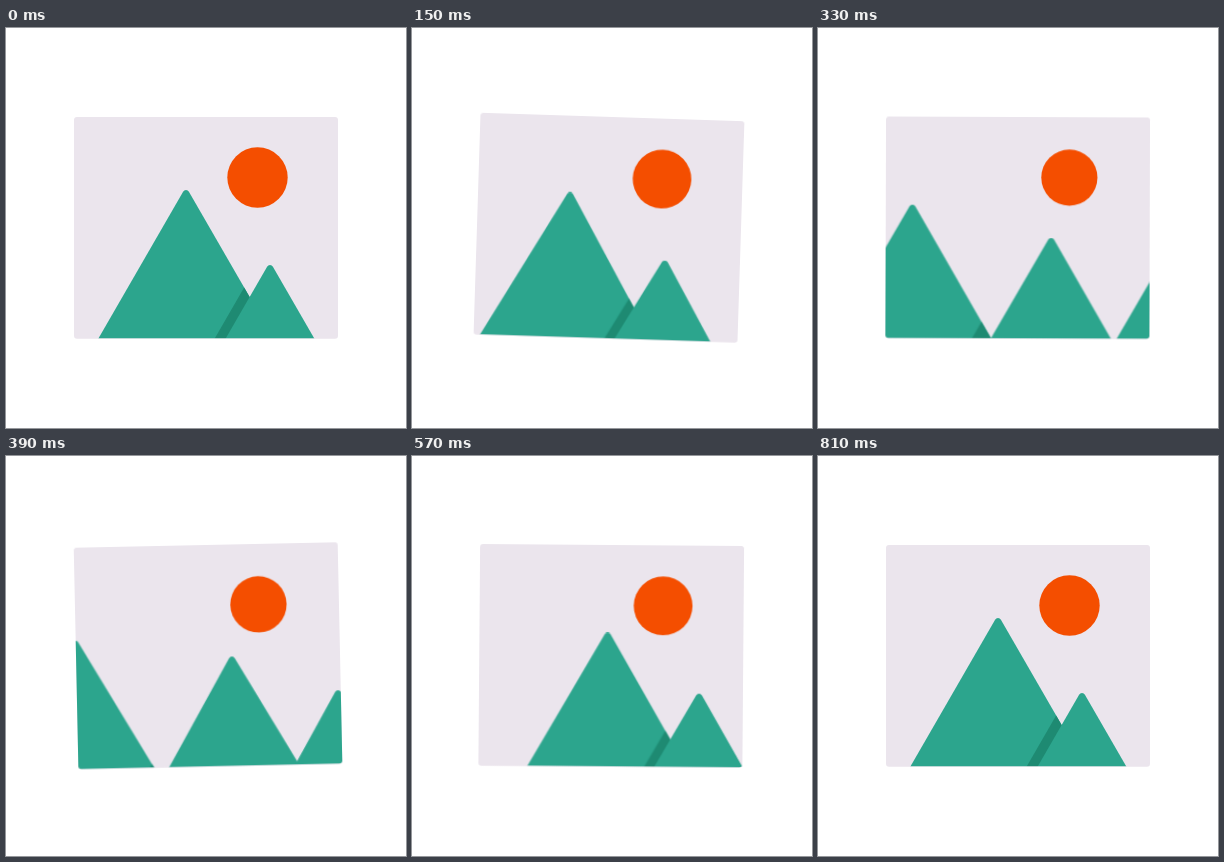
These frames come from a looping animation (400x400 px, 2.87 s). An HTML page without scripts:

```html
<!DOCTYPE html>
<html lang="en">
<head>
<meta charset="utf-8">
<title>Picture placeholder</title>
<style>
  html, body { margin: 0; width: 100%; height: 100%; overflow: hidden; background: #fff; }
  svg { display: block; width: 100vw; height: 100vh; }

  .card, .sun, .move, .shade { animation: 2870ms linear infinite; }
  .card { animation-name: sway; transform-origin: 200px 104px; }
  .sun { animation-name: pulse; transform-origin: 251.5px 149.5px; fill: #f44e00; }
  .move { animation-name: move; }
  .peak { fill: #2ca58d; }
  .shade { fill: #1e8a72; }
  .leave { animation-name: leave; }
  .arrive { animation-name: arrive; }

  /* every mountain glides from --a to --b on the same sine ease */
  @keyframes move {
    0% { transform: translate(var(--a)); animation-timing-function: cubic-bezier(.364, 0, .636, 1); }
    28%, 100% { transform: translate(var(--b)); }
  }
  @keyframes sway {
    0% { transform: rotate(0deg); animation-timing-function: ease-in-out; }
    5.23% { transform: rotate(1.8deg); animation-timing-function: ease-in; }
    11.5% { transform: rotate(.2deg); animation-timing-function: ease-out; }
    14.3% { transform: rotate(-1.35deg); animation-timing-function: ease-in-out; }
    19.86% { transform: rotate(.45deg); animation-timing-function: ease-in-out; }
    28%, 100% { transform: rotate(0deg); }
  }
  @keyframes pulse {
    0% { transform: scale(1); animation-timing-function: ease-in-out; }
    11.8% { transform: scale(.93); animation-timing-function: ease-in-out; }
    26%, 100% { transform: scale(1); }
  }
  /* shadow width */
  @keyframes leave {
    0% { transform: translateX(-11px); }
    5.23% { transform: translateX(-10px); }
    11.5%, 100% { transform: translateX(-19px); }
  }
  @keyframes arrive {
    0%, 15.68% { transform: translateX(3px); }
    19.3% { transform: translateX(-10px); }
    28%, 100% { transform: translateX(-11px); }
  }
</style>
</head>
<body>
<svg viewBox="0 0 400 400">
  <defs>
    <path id="hill" d="M-102.9 174.9L-2.9 1.7A3.4 3.4 0 0 1 2.9 1.7L102.9 174.9Z"/>
    <clipPath id="inHill"><use href="#hill"/></clipPath>
    <clipPath id="inCard"><rect x="68" y="89" width="264" height="221.3" rx="3"/></clipPath>
  </defs>
  <g class="card">
    <rect x="68" y="89" width="264" height="221.7" rx="3" fill="#ebe5ed"/>
    <circle class="sun" cx="251.5" cy="149.5" r="30.2"/>
    <g clip-path="url(#inCard)">
      <g class="move" style="--a: 180px, 162px; --b: -55px, 203px">
        <use class="peak" href="#hill"/>
        <g clip-path="url(#inHill)">
          <g class="move" style="--a: 84px, 75px; --b: 235px, -41px">
            <use class="shade leave" href="#hill"/>
          </g>
        </g>
      </g>
      <g class="move" style="--a: 264px, 237px; --b: 180px, 162px">
        <use class="peak" href="#hill"/>
        <g clip-path="url(#inHill)">
          <g class="move" style="--a: 125px, 0px; --b: 84px, 75px">
            <use class="shade arrive" href="#hill"/>
          </g>
        </g>
      </g>
      <g class="move" style="--a: 389px, 237px; --b: 264px, 237px">
        <use class="peak" href="#hill"/>
      </g>
    </g>
  </g>
</svg>
</body>
</html>
```
